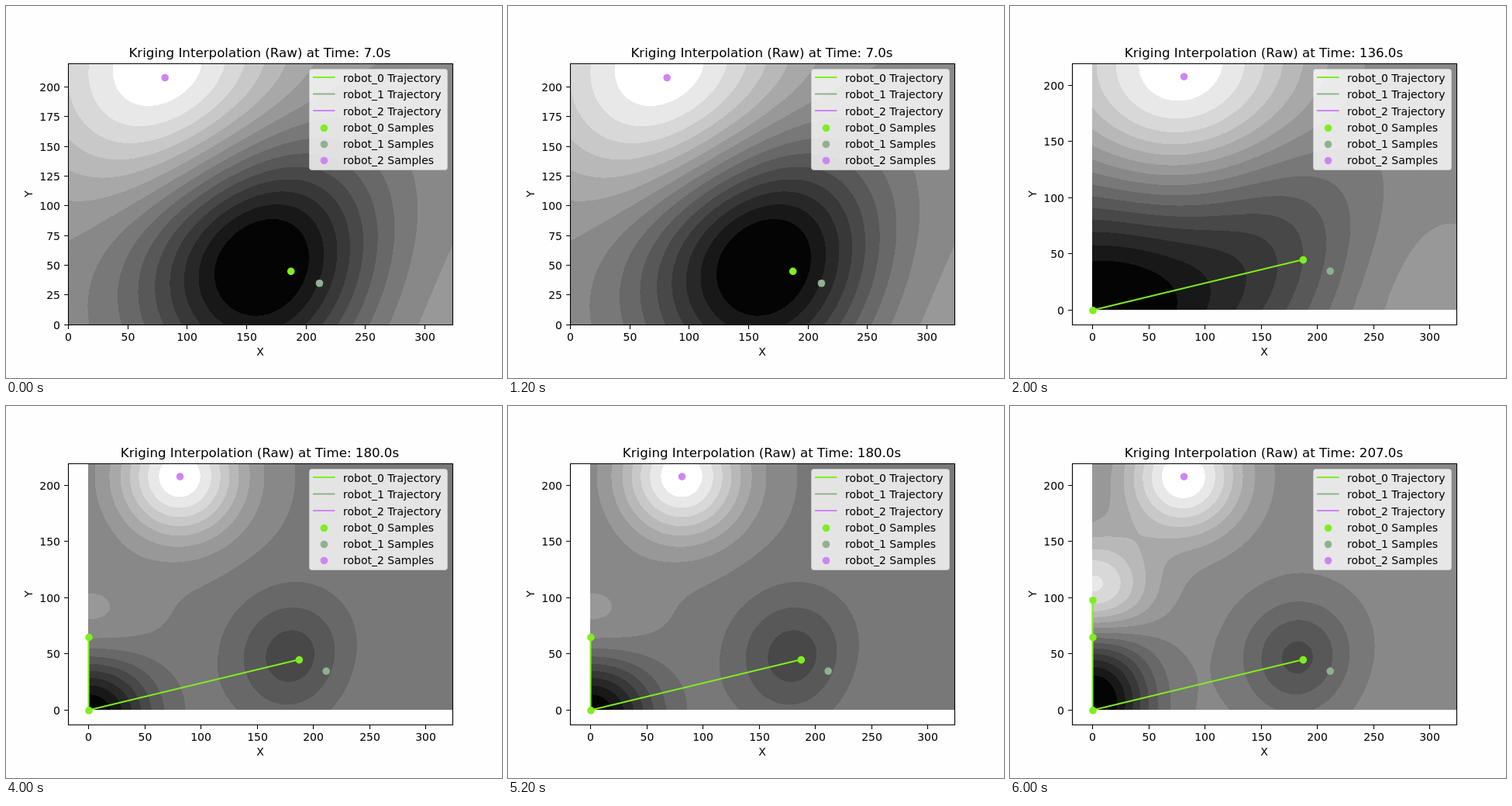
An HTML page with a canvas that plays this animation: 640 px wide and 480 px high, repeating every 8 s.

```html
<!DOCTYPE html>
<html lang="en">
<head>
<meta charset="utf-8">
<title>Kriging Interpolation</title>
<style>
html, body { margin: 0; width: 100%; height: 100%; overflow: hidden; background: #fefefe; }
#stage { position: relative; width: 640px; height: 480px; overflow: hidden; }
canvas, svg { position: absolute; left: 0; top: 0; }
text { font: 14px "DejaVu Sans", Verdana, sans-serif; fill: #000; }
.title { font-size: 16.67px; }
</style>
</head>
<body>
<div id="stage"></div>
<script>
const start = performance.now();
const W = 640, H = 480, HOLD = 2000;
const BOX = { l: 80, t: 74, r: 576, b: 411 };
const COLORS = ['#7fee1e', '#8fb18f', '#ce85f4'];
const WIDE = { x0: 80.5, y0: 411, scale: 1.533, yStep: 25 };
const FULL = { x0: 106.5, y0: 392.5, scale: 1.451, yStep: 50 };
const stage = document.getElementById('stage');

// Samples in data units, by robot
const A = { x: 187, y: 45, robot: 0 };
const B = { x: 211, y: 35, robot: 1 };
const C = { x: 81, y: 208, robot: 2 };
const D = { x: 0, y: 0, robot: 0 };
const E = { x: 0, y: 65, robot: 0 };
const F = { x: 0, y: 98, robot: 0 };

// Each field is a mean plus one weighted Gaussian per sample
const scenes = [
  { time: '7.0', view: WIDE, mean: 8.95, sigma: 76,
    samples: [A, B, C], weights: [-22.5, 14.2, 7.4] },
  { time: '136.0', view: FULL, mean: 8.25, sigma: 80,
    samples: [A, B, C, D], weights: [-14.4, 11.8, 8.1, -8.4] },
  { time: '180.0', view: FULL, mean: 7.75, sigma: 39,
    samples: [A, B, C, D, E], weights: [-4.4, 1.5, 8.1, -8.28, 2.4] },
  { time: '207.0', view: FULL, mean: 8.4, sigma: 36,
    samples: [A, B, C, D, E, F], weights: [-4.45, 1.05, 7.6, -7.9, -5.48, 8.8] }
];

const px = (v, x) => v.x0 + x * v.scale;
const py = (v, y) => v.y0 - y * v.scale;

function field({ mean, sigma, samples, weights }, x, y) {
  return samples.reduce((sum, p, i) =>
    sum + weights[i] * Math.exp(-((x - p.x) ** 2 + (y - p.y) ** 2) / (2 * sigma ** 2)), mean);
}

function gray(z) {
  const band = Math.floor(z);
  return band < 1 ? 4 : band > 14 ? 255 : band * 16 + 8;
}

function paintField(ctx, s) {
  const v = s.view, l = Math.floor(v.x0), w = BOX.r - l, h = Math.floor(v.y0) - BOX.t;
  const img = ctx.createImageData(w, h);
  for (let j = 0; j < h; j++) for (let i = 0; i < w; i++) {
    const x = (l + i + .5 - v.x0) / v.scale, y = (v.y0 - BOX.t - j - .5) / v.scale;
    const g = gray(field(s, x, y));
    img.data.set([g, g, g, 255], (j * w + i) * 4);
  }
  ctx.putImageData(img, l, BOX.t);
}

const text = (x, y, str, anchor = 'middle', more = '') =>
  `<text x="${x}" y="${y}" text-anchor="${anchor}" ${more}>${str}</text>`;
const dot = (x, y, c) => `<circle cx="${x}" cy="${y}" r="4.8" fill="${c}"/>`;
const line = (d, c, w) => `<path d="${d}" fill="none" stroke="${c}" stroke-width="${w}"/>`;

function legend() {
  let out = '<rect x="391.5" y="81.5" width="178" height="130" rx="3" fill="#fff" fill-opacity=".8" stroke="#ccc" stroke-opacity=".8"/>';
  COLORS.forEach((c, i) => {
    const y = 92 + i * 21.5, y2 = 157 + i * 21;
    out += line(`M396 ${y}H424.5`, c, 2) + text(435, y + 5.5, `robot_${i} Trajectory`, 'start');
    out += dot(410.5, y2 + .5, c) + text(435, y2 + 4.5, `robot_${i} Samples`, 'start');
  });
  return out;
}

function axes({ view, time }) {
  const { l, t, r, b } = BOX;
  let ticks = '', out = '';
  for (let v = 0; v <= 300; v += 50) {
    const x = Math.floor(px(view, v)) + .5;
    ticks += `M${x} ${b + 1}v4.9`;
    out += text(x, 432, v);
  }
  for (let v = 0; v <= 200; v += view.yStep) {
    const y = Math.floor(py(view, v)) + .5;
    ticks += `M${l} ${y}h-4.9`;
    out += text(70, y + 5, v, 'end');
  }
  return out + line(ticks, '#000', 1.1)
    + line(`M${l + .5} ${t + .5}H${r + .5}V${b + .5}H${l + .5}Z`, '#000', 1.1)
    + text(328, 451, 'X')
    + text(0, 0, 'Y', 'middle', 'transform="translate(34 242.5) rotate(-90)"')
    + text(327.5, 66, `Kriging Interpolation (Raw) at Time: ${time}s`, 'middle', 'class="title"');
}

function marks({ view, samples }) {
  const route = samples.filter(p => p.robot === 0).map(p => `${px(view, p.x)} ${py(view, p.y)}`);
  return samples.map(p => dot(px(view, p.x) + .5, py(view, p.y) + .4, COLORS[p.robot])).join('')
    + line('M' + route.join('L'), COLORS[0], 2.08);
}

const layers = scenes.map(s => {
  const el = document.createElement('div');
  el.innerHTML = `<canvas width="${W}" height="${H}"></canvas>`
    + `<svg width="${W}" height="${H}">${marks(s)}${axes(s)}${legend()}</svg>`;
  paintField(el.firstChild.getContext('2d'), s);
  stage.append(el);
  return el;
});

function show(now) {
  const k = Math.floor(Math.max(0, now - start) / HOLD) % layers.length;
  layers.forEach((el, i) => el.style.visibility = i === k ? 'visible' : 'hidden');
  requestAnimationFrame(show);
}
show(start);
</script>
</body>
</html>
```
